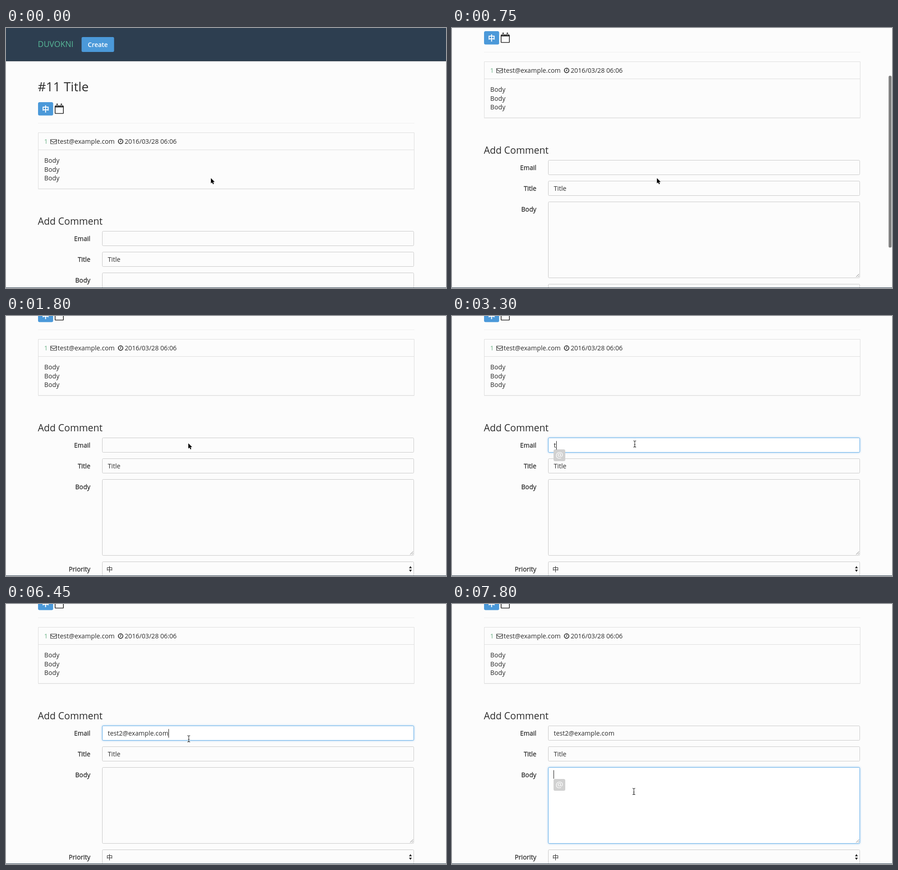
An HTML page that plays this animation: 975x575 px, repeating every 8 s.

```html
<!DOCTYPE html>
<html lang="en">
<head>
<meta charset="utf-8">
<title>Add comment</title>
<style>
  html, body { margin: 0; width: 100%; height: 100%; overflow: hidden; background: #fcfcfc; }
  svg { display: block; width: 975px; height: 575px; font: 14.2px "Open Sans", sans-serif; fill: #2b2b2b; }
  .box { fill: #fcfcfc; stroke: #c8c8c8; }
  .focus { fill: #fff; stroke: #66afe9; filter: drop-shadow(0 0 2px rgba(102, 175, 233, .7)); }
  .label { text-anchor: end; stroke: #2b2b2b; stroke-width: .3; }
  .line { fill: none; stroke: #ddd; }
  .icon { fill: none; stroke: #2b2b2b; }
  .blue { fill: #4b99d9; }
  .cjk { font-family: "Noto Sans CJK JP", "Noto Sans CJK", sans-serif; }
  .mid { text-anchor: middle; fill: #fff; }
</style>
</head>
<body>
<svg viewBox="0 0 975 575">
  <g id="page">
    <rect width="975" height="73" fill="#2d3e50"/>
    <rect y="72" width="975" height="1.5" fill="#22303e"/>
    <text x="70.5" y="42" font-size="17.7" fill="#57b898">DUVOKNI</text>
    <rect class="blue" x="167.500" y="20" width="72" height="33" rx="3"/>
    <text class="mid" x="203.500" y="41.500" font-size="14" font-weight="600">Create</text>

    <text x="70.500" y="139.500" font-size="28">#11 Title</text>
    <rect class="blue" x="71" y="164" width="33.500" height="29.500" rx="3.500"/>
    <text class="mid cjk" x="87.700" y="184.500" font-size="16" font-weight="700">中</text>
    <rect class="icon" x="108.800" y="172.300" width="18.400" height="16.700" rx="1" stroke-width="1.700"/>
    <path class="icon" d="M109 174h18" stroke-width="3"/>
    <path class="icon" d="M113.300 168.500v5M122.700 168.500v5" stroke-width="3.200" stroke-linecap="round"/>
    <path class="icon" d="M113.300 169v4M122.700 169v4" style="stroke:#fcfcfc"/>
    <path class="line" d="M71 210.500H905" style="stroke:#eee"/>

    <path d="M71 356.500H905" stroke="#000" stroke-opacity=".06"/>
    <path class="line" d="M71.500 231.500h833v124h-833zM71.500 269.500h833"/>
    <text x="84.500" y="256" fill="#69b184">1</text>
    <path class="icon" d="M99 246.500h13v9.500h-13zM99 248.500l6.500 4.500 6.500-4.500" stroke-width="1.200"/>
    <text x="114.500" y="256">test@example.com</text>
    <circle class="icon" cx="254" cy="250.800" r="5" stroke-width="1.800"/>
    <path class="icon" d="M254.500 247.500v4h-2.500" stroke-width="1.200"/>
    <text x="263" y="256">2016/03/28 06:06</text>
    <text x="84.700" y="298">Body</text>
    <text x="84.700" y="317.500">Body</text>
    <text x="84.700" y="337">Body</text>

    <text x="70.500" y="434.500" font-size="21.300">Add Comment</text>
    <text class="label" x="187" y="470.500">Email</text>
    <text class="label" x="187" y="516.500">Title</text>
    <text class="label" x="187" y="562.500">Body</text>
    <text class="label" x="187" y="744.500">Priority</text>

    <rect class="box" x="213.500" y="449.500" width="690" height="32" rx="2"/>
    <rect class="box" x="213.500" y="495.500" width="690" height="32" rx="2"/>
    <rect class="box" x="213.500" y="541.500" width="690" height="168" rx="2"/>
    <rect class="box" x="213.500" y="723.500" width="690" height="32" rx="2"/>
    <rect class="focus" id="emailFocus" x="213.500" y="449.500" width="690" height="32" rx="2"/>
    <rect class="focus" id="bodyFocus" x="213.500" y="541.500" width="690" height="168" rx="2"/>
    <path d="M895.500 707.500l6.500-6.500M899.500 707.500l2.500-2.500" stroke="#777"/>
    <text id="email" x="225.500" y="470.500"></text>
    <text x="225.500" y="517">Title</text>
    <text class="cjk" x="222.500" y="744.500" font-size="14">中</text>
    <path d="M893 738l3.200-5 3.200 5zM893 741l3.200 5 3.200-5z"/>

    <g id="badge">
      <rect width="26" height="26" rx="3.500" fill="#d1d1d1"/>
      <text class="mid" x="13" y="19" font-size="19">@</text>
    </g>
    <rect id="caret" width="1" height="19" fill="#111"/>
  </g>

  <rect id="bar" x="967.500" width="6.500" height="380" rx="3.200" fill="#7f7f7f"/>
  <rect y="574" width="975" height="1" fill="#1c2f3f"/>
  <path id="arrow" d="M0 0v11.800l2.700-2.500 1.900 4.200 2-.9-1.800-4.100h3.700z" fill="#000" stroke="#fff" stroke-width="1.400" paint-order="stroke"/>
  <g id="beam" fill="none">
    <path d="M-3-7q3 0 3 2v10q0 2-3 2M3-7q-3 0-3 2v10q0 2 3 2M-1.500 1.500h3" stroke="#fff" stroke-width="2.400"/>
    <path d="M-3-7q3 0 3 2v10q0 2-3 2M3-7q-3 0-3 2v10q0 2 3 2M-1.500 1.500h3" stroke="#222" stroke-width="1.100"/>
  </g>
</svg>
<script>
const $ = id => document.getElementById(id);
const STEP = 150, LOOP = 8000;
const address = "test2@example.com";
const scrolls = [0, 34, 104, 157, 169, 175, 178, 180];             // from 300 ms
const typed = [0, 1, 2, 3, 4, 4, 5, 6, 6, 6, 7, 8, 9, 10, 11, 12, 13, 14, 16, 17]; // from 3150 ms
const pointer = [                                                   // time, x, y
  [1350, 454, 332], [1500, 447, 325], [1650, 419, 296], [1800, 404, 281.5],
  [2550, 404, 281.5], [2700, 405, 283], [6300, 405, 283], [6450, 405, 298],
  [6750, 404.5, 333], [6900, 404.5, 333], [7350, 403, 408], [7500, 403, 414.5]
];

const clamp = (v, lo = 0, hi = 1) => Math.min(hi, Math.max(lo, v));
const pick = (list, start, t) => list[clamp(Math.floor((t - start) / STEP), 0, list.length - 1)];
const move = (id, x, y) => $(id).setAttribute("transform", `translate(${x} ${y})`);
const fade = (id, a) => $(id).style.opacity = a;

function pointerAt(t) {
  const i = pointer.findIndex(k => k[0] >= t);
  if (i < 1) return pointer[i < 0 ? pointer.length - 1 : 0].slice(1);
  const [a, b] = [pointer[i - 1], pointer[i]];
  const p = (t - a[0]) / (b[0] - a[0]);
  return [a[1] + (b[1] - a[1]) * p, a[2] + (b[2] - a[2]) * p];
}

function draw(time) {
  const t = Math.floor(time / STEP) * STEP;
  const scroll = pick(scrolls, 300, t);
  const inBody = t >= 7650;
  const emailOn = t < 2700 || inBody ? 0 : t < 2850 ? .5 : 1;
  const bodyOn = !inBody ? 0 : t < 7800 ? .5 : 1;

  move("page", 0, -scroll);
  $("bar").setAttribute("y", 2 + scroll * .66);
  fade("bar", t < 450 ? 0 : clamp((1800 - t) / 450));

  $("email").textContent = address.slice(0, pick(typed, 3150, t));
  fade("emailFocus", emailOn);
  fade("bodyFocus", bodyOn);

  move("badge", 225, inBody ? 567 : 475);
  fade("badge", inBody ? bodyOn : emailOn * clamp((4950 - t) / 1650));

  const caretX = inBody ? 225 : 225.5 + $("email").getComputedTextLength();
  move("caret", Math.round(caretX), inBody ? 547.5 : 456.5);
  fade("caret", t < 2700 || (t >= 6600 && t < 7050) || t === 7500 ? 0 : 1);

  const [x, y] = pointerAt(t);
  move("arrow", x, y);
  move("beam", x, y);
  fade("arrow", t < 2700 ? 1 : 0);
  fade("beam", t < 2700 ? 0 : 1);
}

const start = performance.now();
function tick() {
  draw((performance.now() - start) % LOOP);
  requestAnimationFrame(tick);
}
tick();
</script>
</body>
</html>
```
